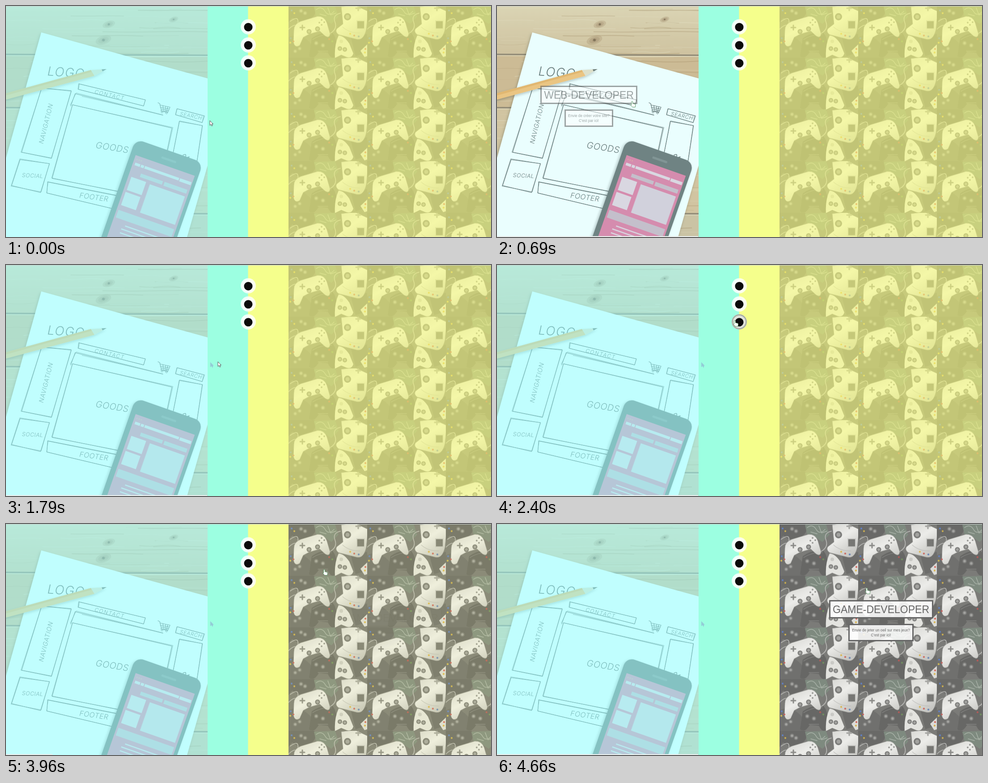
Animation, 1085 px wide and 516 px high, one loop 4740 ms. Source, as an HTML page:

```html
<!DOCTYPE html>
<html lang="fr">
<head>
<meta charset="utf-8">
<title>Portfolio</title>
<style>
html, body { margin: 0; width: 100%; height: 100%; overflow: hidden; }
body { position: relative; background: #fff; font-family: "Liberation Sans", Arial, sans-serif; }
#stage { position: absolute; left: 0; top: 0; width: 1085px; height: 516px; overflow: hidden; }
#stage > * { position: absolute; }
.tint { top: 0; height: 516px; }
#webTint { left: 0; width: 451px; background: rgb(152,255,255); }
#gameTint { left: 632px; width: 453px; background: rgb(250,255,125); }
.card { display: flex; flex-direction: column; align-items: center; color: #666; text-align: center; }
.card div { box-sizing: border-box; border: 3px solid #666; background: rgba(255,255,255,.87); white-space: nowrap; }
.card .name { height: 41px; padding: 0 5.5px; font-size: 23px; line-height: 36px; }
.card .hint { height: 39px; margin-top: 12.5px; padding: 5.5px 5px 0; font-size: 8.2px; line-height: 11.5px; }
#webCard { left: 0; width: 411px; }
#gameCard { left: 632px; width: 454px; }
#status { left: 0; top: 514px; height: 2px; background: #e9eeed; }
#edge { left: 0; top: 0; width: 1085px; height: 1px; background: #c9d0ce; }
</style>
</head>
<body>
<div id="stage">
  <svg id="art" width="1085" height="516"></svg>
  <div id="webTint" class="tint"></div>
  <div id="gameTint" class="tint"></div>
  <div id="webCard" class="card">
    <div class="name">WEB-DEVELOPER</div>
    <div class="hint">Envie de créer votre site?<br>C'est par ici!</div>
  </div>
  <div id="gameCard" class="card">
    <div class="name">GAME-DEVELOPER</div>
    <div class="hint">Envie de jeter un oeil sur mes jeux?<br>C'est par ici!</div>
  </div>
  <svg id="ui" width="1085" height="516"></svg>
  <div id="status"></div>
  <div id="edge"></div>
</div>
<script>
const $ = id => document.getElementById(id);
let seed = 11;
const rnd = (a = 0, b = 1) => {
  seed = (seed * 16807) % 2147483647;
  return a + (b - a) * seed / 2147483647;
};
const rect = (x, y, w, h, fill, extra = '') =>
  `<rect x="${x}" y="${y}" width="${w}" height="${h}" fill="${fill}" ${extra}/>`;
const path = (d, fill, extra = '') => `<path d="${d}" fill="${fill}" ${extra}/>`;
const line = (d, color, width) =>
  path(d, 'none', `stroke="${color}" stroke-width="${width}" stroke-linecap="round" stroke-linejoin="round"`);
const dot = (x, y, r, fill, extra = '') => `<circle cx="${x}" cy="${y}" r="${r}" fill="${fill}" ${extra}/>`;

// Wooden table
function wood() {
  let s = rect(0, 0, 451, 516, 'url(#plank)') + rect(0, 110, 451, 118, '#d9ab7c') +
    rect(0, 228, 451, 235, '#deb68a') + rect(0, 463, 451, 53, '#d6b48e');
  for (let i = 0; i < 150; i++) {
    const y = rnd(0, 516), x = rnd(-80, 400), w = rnd(60, 260), k = rnd(-3, 3);
    const tone = rnd() < .5 ? '150,98,52' : '250,226,196';
    s += line(`M${x} ${y}q${w / 4} ${k} ${w / 2} 0t${w / 2} ${k / 2}`, `rgba(${tone},${rnd(.1, .34)})`, rnd(.6, 2.4));
  }
  for (const [x, y, r] of [[230, 41, 8], [218, 76, 10], [375, 30, 6]]) {
    for (let i = 3; i > 0; i--)
      s += `<ellipse cx="${x}" cy="${y}" rx="${r * i * .6}" ry="${r * i * .32}" fill="rgba(140,88,48,.22)" transform="rotate(-18 ${x} ${y})"/>`;
    s += dot(x, y, r * .3, '#7d5434');
  }
  for (const y of [109, 228, 463])
    s += line(`M0 ${y - 1}L451 ${y + 1}`, '#8d6d55', 3) + line(`M0 ${y + 2}L451 ${y + 4}`, 'rgba(250,230,205,.7)', 1.2);
  return s;
}

// Pencil-drawn outline: two slightly different passes
function sketch(points, closed = true) {
  let s = '';
  for (let pass = 0; pass < 2; pass++) {
    const p = points.map(([x, y]) => `${x + rnd(-1.4, 1.4)} ${y + rnd(-1.4, 1.4)}`);
    s += line('M' + p.join('L') + (closed ? 'Z' : ''), '#646464', pass ? .8 : 1.3);
  }
  return s;
}
const hand = (text, x, y, size, angle, width) =>
  `<text transform="translate(${x} ${y}) rotate(${angle}) skewX(-8)" font-size="${size}" letter-spacing="${width}"
    font-family="Inter, 'Open Sans', sans-serif" font-weight="300" fill="#5c5c5c">${text}</text>`;

function wireframe() {
  const boxes = [
    [[164, 174], [312, 210], [309, 223], [162, 186]],
    [[382, 230], [443, 246], [440, 261], [380, 244]],
    [[81, 182], [146, 189], [102, 340], [34, 326]],
    [[148, 220], [372, 272], [338, 432], [102, 384]],
    [[388, 257], [440, 268], [420, 400], [372, 340]],
    [[32, 342], [96, 353], [78, 416], [12, 402]],
    [[94, 394], [270, 428], [262, 459], [91, 418]]
  ];
  return boxes.map(b => sketch(b)).join('') +
    sketch([[145, 222], [156, 195], [350, 243]], false) + line('M170 202L333 239', '#777', .8) +
    line('M340 216l4 2l4 17l14 3M344 221l23 5l-5 11l-16-3M345 226l20 4M347 230l17 4M351 222l1 12M357 224l-1 11M362 225l-3 11', '#5c5c5c', 1.2) +
    line('M396 333q8-4 6 3t8 1M399 341l10-4', '#5c5c5c', 1.5) +
    dot(349, 237, 2, 'none', 'stroke="#5c5c5c"') + dot(359, 239, 2, 'none', 'stroke="#5c5c5c"') +
    hand('LOGO', 91, 155, 28, 4, 1.5) + hand('CONTACT', 197, 195, 12, 13, 1.6) +
    hand('SEARCH', 388, 244, 11.5, 12, .8) + hand('NAVIGATION', 83, 309, 14, -76, .8) +
    hand('GOODS', 199, 317, 20, 9, .5) + hand('SOCIAL', 35, 382, 12.5, 3, .4) +
    hand('FOOTER', 163, 428, 16, 8, .4);
}

function phone() {
  const light = '#e8cdda', bar = '#ceb0be';
  return `<g transform="translate(290 297) rotate(19.3)" filter="url(#shade)">` +
    rect(0, 0, 160, 320, '#666', 'rx="19"') + rect(68, 17, 35, 5, '#7b7b7b', 'rx="2.5"') +
    rect(12, 34, 140, 290, '#e4719b') +
    [18, 23, 28].map(x => dot(x, 42, 1.2, '#eda08c')).join('') +
    [[17, 50, 12, 6], [31, 50, 7, 6], [40, 50, 81, 6], [123, 50, 27, 7], [19, 83, 35, 31], [18, 119, 35, 31],
      [42, 190, 90, 2.5], [36, 199, 104, 2.5], [36, 208, 90, 2.5]].map(r => rect(...r, light)).join('') +
    [[37, 69, 52, 8], [93, 69, 54, 9], [16, 162, 132, 18]].map(r => rect(...r, bar)).join('') +
    rect(63.5, 85, 83, 67, '#dfc6d4') + '</g>';
}

const pencil = () => `<g filter="url(#shade)">` +
  path('M-4 196L190 143L198 156L-4 210Z', '#fdb766') + path('M-4 196L190 143L192 147L-4 201Z', '#f3a650') +
  path('M190 143L225 141L198 156Z', '#eed9bd') + path('M214 141.6L225 141L216 146Z', '#5d5a58') + '</g>';

// One repeat of the controller wallpaper
function pads() {
  const stick = (x, y, r) => dot(x, y, r, '#7c7c7a') + dot(x, y, r * .55, '#a3a3a0');
  const dots = list => list.map(([x, y, c]) => dot(x, y, 2.1, c)).join('');
  return rect(0, 0, 176, 116, '#7b7b78') +
    path('M0 0H58Q66 20 46 30T8 26L0 36Z', '#696967') + path('M0 70Q20 58 42 76T50 116H0Z', '#70706e') +
    path('M57 2L104 0L112 24L96 40L84 32L62 24Z', '#7e8a7f') +
    line('M62 8q12-9 20 4t20 0M88 4l6 16l12-4M70 18l14 4', '#a9b2a8', 1.5) +
    path('M52 72Q74 56 98 60Q112 74 106 112Q96 122 88 104L68 102Q56 122 46 112Z', '#676765') +
    line('M54 75q20-13 42-11M66 101h22', '#898987', 1.2) +
    path('M140 72L176 62V104L150 112Z', '#6d6d6b') +
    line('M0 52Q12 40 18 44M4 34Q26 18 20 44M92 62Q110 52 104 36T116 16', '#b4b4b1', 1.8) +
    path('M118 2L148 -2L178 12L174 52Q168 78 152 74L112 64Q104 58 108 51L122 40Z', 'url(#shell)', 'stroke="#969693" stroke-width=".8"') +
    rect(153, 33, 17, 18, '#777774', 'stroke="#c9c9c6" stroke-width="2"') + stick(132, 24, 8) +
    line('M151 5h10M156 0v10', '#a6a6a3', 3.4) + line('M121 47Q137 61 160 60', '#b9b9b6', 1) +
    path('M12 54Q12 40 28 34L65 23Q80 22 86 38L93 62Q92 73 82 67L70 56L46 63L33 70L25 88Q14 95 11 81Z', 'url(#shell)', 'stroke="#8d8d8a" stroke-width=".8"') +
    line('M26 48h10M31 43v10', '#8a8a87', 3) + stick(46, 57, 5.5) + stick(65, 51, 5.5) +
    [[74, 31], [74, 42], [69, 37], [80, 36]].map(([x, y]) => dot(x, y, 2, '#999996')).join('') +
    path('M112 66Q124 66 136 84L145 106Q142 117 130 114L118 109L104 116Q102 88 112 66Z', '#e3e3df') +
    stick(115, 95, 5) + stick(126, 97, 5) + dot(118, 79, 4, '#c9c9c5') +
    path('M176 86L161 100L170 114L176 112Z', '#dcdcd8') +
    dots([[5, 72, '#617fc2'], [11, 79, '#bd625e'], [4, 82, '#d0ba54'], [138, 62, '#d8b44f'], [147, 66, '#cb6b61'],
      [157, 68, '#6b86b6'], [172, 96, '#d2665d'], [171, 104, '#d8b44f'], [91, 74, '#b45b58'], [98, 79, '#71905f'],
      [7, 10, '#617fc2'], [13, 16, '#c9ad51']]) +
    [[28, 11], [37, 16], [15, 101], [25, 95], [62, 83], [77, 88]].map(([x, y]) => stick(x, y, 5)).join('');
}

$('art').innerHTML = `<defs>
  <linearGradient id="plank" x2="0" y2="1"><stop offset="0" stop-color="#eacaa2"/><stop offset=".2" stop-color="#dcb58a"/></linearGradient>
  <linearGradient id="shell" x2=".6" y2="1"><stop offset="0" stop-color="#d4d4d0"/><stop offset=".5" stop-color="#ecece9"/><stop offset="1" stop-color="#c6c6c2"/></linearGradient>
  <filter id="shade" x="-20%" y="-20%" width="140%" height="140%"><feDropShadow dx="-2" dy="3" stdDeviation="3" flood-opacity=".3"/></filter>
  <clipPath id="photo">${rect(0, 0, 451, 516, '#000')}</clipPath>
  <pattern id="pads" x="632" y="0" width="176" height="115.5" patternUnits="userSpaceOnUse">${pads()}</pattern>
  </defs><g clip-path="url(#photo)">` + wood() +
  path('M79 59L470 167V290L405 516V530H-20V411Z', '#fefefe', 'filter="url(#shade)"') +
  wireframe() + pencil() + phone() + '</g>' +
  rect(451, 0, 91, 516, '#9cffe1') + rect(541.5, 0, 91, 516, '#f5ff8c') + rect(632, 0, 453, 516, 'url(#pads)');

const buttons = [46.5, 87, 127];
$('ui').innerHTML = path('M457 217v11l3-2l2 4l2-6Z', '#93cdd6', 'id="ghost"') +
  buttons.map(y => dot(542, y, 17, '#fff', 'opacity=".8"') + dot(542, y, 14, '#fff', 'opacity=".55"') +
    `<g class="hover">${dot(542, y, 15.5, '#e1e3dc', 'stroke="#a9b0a6" stroke-width="3"')}</g>` +
    dot(542, y + .8, 9.5, '#0b0b0b')).join('') +
  path('M0 0V10.5L2.5 8.3L4.2 12L6 11.2L4.4 7.6H7.4Z', '#fff', 'id="arrow" stroke="#444" stroke-width=".9"') +
  path('M3 0q1.5 0 1.5 1.5V5l5 1.2q1.3.4 1.1 2L10 13H4L.2 8.6Q-.3 7.2 1.6 7.7V1.5Q1.6 0 3 0Z', '#fff', 'id="pointer" stroke="#4f8f5a" stroke-width=".9"');

const LOOP = 4740;
const ticks = [0];
for (const [from, to, n] of [[80, 540, 7], [610, 850, 4], [1310, 1790, 7], [1870, 2320, 7], [2400, 2890, 7],
  [2950, 3340, 6], [3510, 3960, 7], [4040, 4420, 6], [4560, 4660, 3]])
  for (let i = 0; i < n; i++) ticks.push(Math.round(from + (to - from) * i / (n - 1)));
const hold = t => ticks.filter(k => k <= t).pop();

// Mouse route: time, x, y
const route = [[0, 456, 256], [80, 453, 254], [540, 322, 211], [850, 275, 215], [1230, 275, 215], [1700, 457, 217],
  [1790, 474, 216], [2320, 522, 134], [2400, 529, 124], [2890, 538, 83], [3340, 538, 40], [3510, 545, 43],
  [4040, 738, 112], [4420, 806, 136], [4660, 824, 143]];
function mouse(t) {
  const i = Math.max(1, route.findIndex(k => k[0] >= t));
  const [a, ax, ay] = route[i - 1], [b, bx, by] = route[i], p = (t - a) / (b - a);
  return [ax + (bx - ax) * p, ay + (by - ay) * p];
}
const ramp = (t, a, b) => Math.min(1, Math.max(0, (t - a) / (b - a)));
const show = (el, on) => { el.style.visibility = on ? 'visible' : 'hidden'; };
const hovers = document.querySelectorAll('.hover');

function card(id, p, from, to) {
  $(id).style.opacity = p;
  $(id).style.top = from + (to - from) * p + 'px';
}

function draw(time) {
  const t = hold(time), web = t < 1790;
  $('webTint').style.opacity = .6 * (1 - (web ? ramp(t, 395, 830) : 0));
  $('gameTint').style.opacity = .6 * (1 - ramp(t, 3640, 4040));
  card('webCard', web ? ramp(t, 460, 850) : 0, 159, 191);
  card('gameCard', ramp(t, 3950, 4420), 189, 169.5);

  const [x, y] = mouse(t);
  const over = buttons.findIndex(by => Math.hypot(x + 4 - 542, y + 4 - by) < 18);
  hovers.forEach((el, i) => show(el, i === over));
  const link = x < 450 || x > 632 || over >= 0;
  show($('arrow'), !link);
  show($('pointer'), link);
  $(link ? 'pointer' : 'arrow').setAttribute('transform', `translate(${x} ${y})`);
  show($('ghost'), t >= 1790);

  const wide = (t >= 690 && t < 2950) || t > 4040;
  $('status').style.width = (wide ? 450 : t >= 2950 && t < 4040 ? 104 : 0) + 'px';
}

const start = performance.now();
function frame() {
  draw((performance.now() - start) % LOOP);
  requestAnimationFrame(frame);
}
frame();
</script>
</body>
</html>
```
